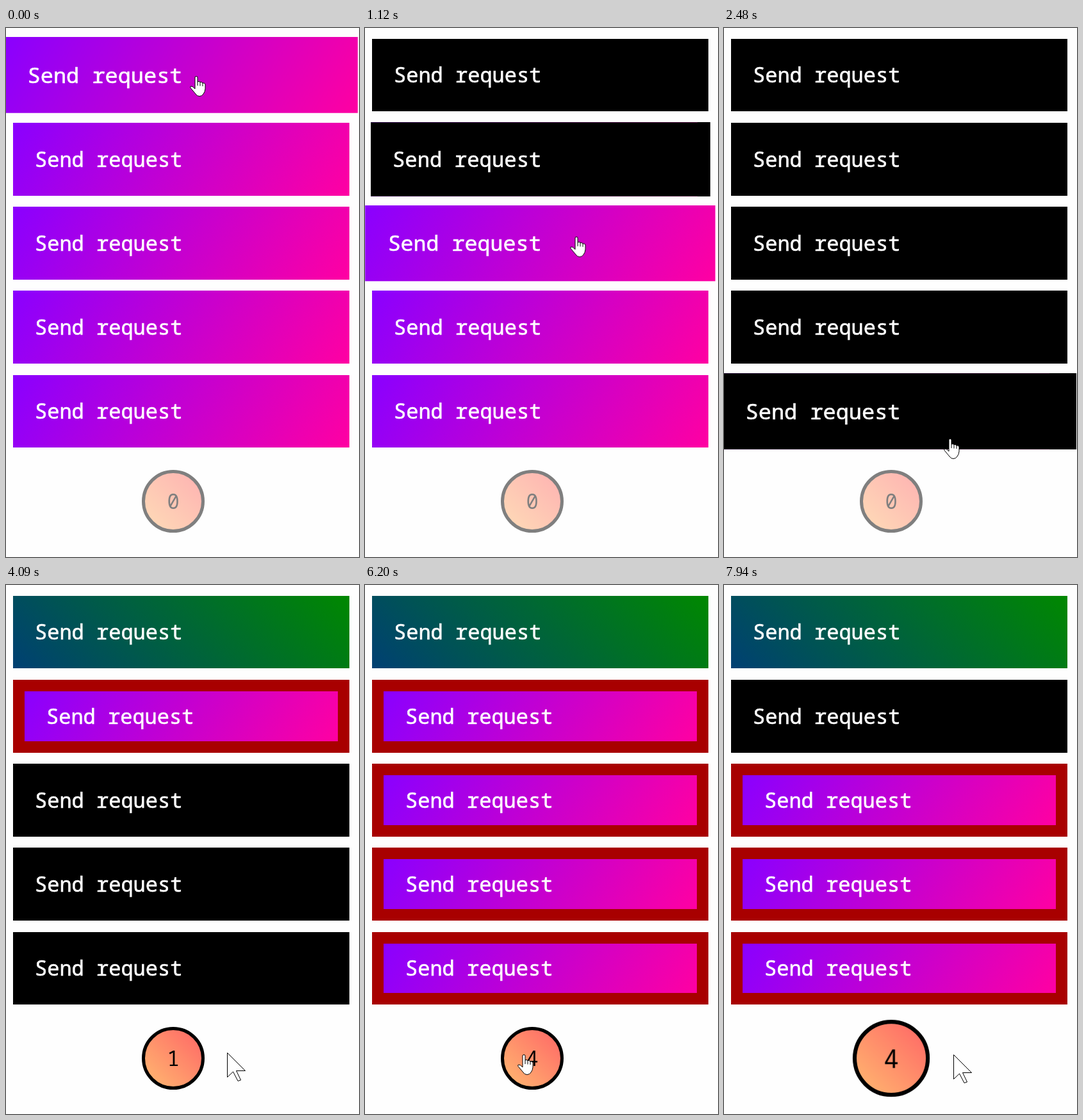
An HTML page that plays this animation: 551x826 px, repeating every 8000 ms.

```html
<!DOCTYPE html>
<html lang="en">
<head>
<meta charset="utf-8">
<title>Request queue</title>
<style>
  html, body { margin: 0; width: 100%; height: 100%; overflow: hidden; background: #fefefe; }
  body { position: relative; font: 32px "Noto Sans Mono", monospace; }

  .button {
    position: absolute; left: 11px; width: 525px;
    box-sizing: border-box; border: 0 solid #a80000;
    display: flex; align-items: center; color: #fff;
    background: linear-gradient(120deg, #8a00ff, #ff00a2);
  }
  .button::before, .button.ok::after { content: ""; position: absolute; inset: 0; }
  .button.ok::after { background: linear-gradient(45deg, #004073, #008800); animation: ok 8s infinite; }
  .button span {
    position: relative; z-index: 1; left: 34px; top: -1px;
    white-space: pre; -webkit-text-stroke: .6px #fff;
  }

  .counter {
    position: absolute; left: 212px; top: 690px; width: 88px; height: 88px;
    border: 5px solid #000; border-radius: 50%; overflow: hidden;
    background: linear-gradient(45deg, #ffb970, #ff6666);
    text-align: center; line-height: 88px;
    animation: wake 8s infinite, pulse 8s infinite;
  }
  .digits { animation: count 8s step-end infinite; }

  .cursor { position: absolute; left: 0; top: 0; animation: move 8s linear infinite; }
  .cursor svg { position: absolute; overflow: visible; fill: #fff; stroke: #000; stroke-linejoin: round; }
  .hand { left: -10px; animation: hand 8s step-end infinite; }
  .arrow { animation: arrow 8s step-end infinite; }
</style>
</head>
<body>
<div class="counter"><div class="digits">0<br>1<br>2<br>3<br>4</div></div>
<div class="cursor">
  <svg class="hand" width="25" height="32">
    <path d="M8 2Q8 .5 10 .5Q12 .5 12 2V9Q14 7.5 16 9.5Q18 8.5 20 11Q23 10 24 13V20Q23.5 25 21 28Q19 31.5 15 31.5Q11 31.5 9 28L1 18.5Q0 16 2 16Q4 15.5 8 20Z"/>
    <path d="M12 9V15M16 9.5V15.5M20 11V16" fill="none"/>
  </svg>
  <svg class="arrow" width="30" height="46">
    <path d="M.5.5V38.5L9.5 30L17 44.5L21.5 43L14.5 28.5H28.5Z"/>
  </svg>
</div>
<script>
const LOOP = 8000, FADE = 200, PITCH = 131.25;
const RETRY = 7330, PEAK = RETRY + 510;
const presses = [630, 880, 1450, 1786, 2260];

// Where the pointer rests, and from when to when: one stop per button, then aside, counter, aside.
const stops = [
  { x: 297, y: 75, from: 0, to: 640 },
  { x: 310, y: 215, from: 860, to: 912 },
  { x: 331, y: 331, from: 1131, to: 1460 },
  { x: 346, y: 505, from: 1780, to: 1880 },
  { x: 353, y: 641, from: 2160, to: 2500 },
  { x: 345, y: 730, from: 2810, to: 5850 },
  { x: 248, y: 733, from: 6200, to: 7400 },
  { x: 358, y: 733, from: 7700, to: LOOP }
];

// Time at which the pointer, leaving stop i, passes a coordinate.
const crossing = (i, axis, value) => {
  const a = stops[i], b = stops[i + 1];
  return a.to + (b.from - a.to) * (value - a[axis]) / (b[axis] - a[axis]);
};
const leaveTime = i => crossing(i, "y", 139.5 + PITCH * i);
const doneTime = i => i ? 3380 + 455 * i : presses[0] + 2000;

let css = "";
const keyframes = (name, steps) => {
  css += `@keyframes ${name} {` +
    steps.map(([ms, rule]) => `${(ms / LOOP * 100).toFixed(4)}% {${rule}}`).join(" ") + "}\n";
};
const scale = s => `transform:scale(${s})`;
const opacity = o => `opacity:${o}`;
const paint = c => `background:${c}`;

// Rests on the first value, then eases to each next one from its given time.
const eased = (start, ...changes) => {
  const steps = [];
  let rule = start;
  for (const [ms, next] of changes) {
    steps.push([ms, rule], [ms + FADE, next]);
    rule = next;
  }
  return [[0, start], ...steps, [LOOP, rule]];
};
const jump = (ms, before, after) => [[ms - 1, before], [ms, after]];
const blacken = ms => [...jump(ms, paint("transparent"), paint("#fff")), [ms + FADE, paint("#000")]];

presses.forEach((press, i) => {
  const el = document.createElement("div");
  const top = Math.round(16.6 + PITCH * i);
  el.className = i ? "button" : "button ok";
  el.id = "b" + i;
  el.style.top = top + "px";
  el.style.height = Math.round(130.3 + PITCH * i) - top + "px";
  el.innerHTML = "<span>Send request</span>";
  document.querySelector(".counter").before(el);

  const retried = i === 1;
  const leave = [leaveTime(i), scale(1)];
  keyframes("hover" + i, i ? eased(scale(1), [leaveTime(i - 1), scale(1.05)], leave) : eased(scale(1.05), leave));

  keyframes("fill" + i, [
    [0, paint("transparent")], ...blacken(press),
    ...jump(doneTime(i), paint("#000"), paint("transparent")),
    ...(retried ? blacken(RETRY) : []),
    [LOOP, paint(retried ? "#000" : "transparent")]
  ]);

  const thin = "border-width:0", thick = "border-width:18px";
  const borders = i ? [[doneTime(i), thick]] : [];
  if (retried) borders.push([RETRY, thin]);
  keyframes("border" + i, eased(thin, ...borders));

  css += `#b${i} { animation: hover${i} 8s infinite, border${i} 8s infinite; }
    #b${i}::before { animation: fill${i} 8s infinite; }\n`;
});

keyframes("ok", [[0, opacity(0)], ...jump(doneTime(0), opacity(0), opacity(1)), [LOOP, opacity(1)]]);
keyframes("wake", eased(opacity(.5), [doneTime(1), opacity(1)]));
keyframes("count", presses.map((_, i) => [i ? doneTime(i) : 0, `transform:translateY(${-88 * i}px)`])
  .concat([[LOOP, "transform:translateY(-352px)"]]));

// The loop cuts the pulse off on its way down.
keyframes("pulse", [[0, scale(1)], [RETRY, scale(1)],
  [PEAK, scale(1.333) + ";animation-timing-function:linear"], [LOOP, scale(1.165)]]);

keyframes("move", stops.flatMap(({ x, y, from, to }) =>
  [from, to].map(ms => [ms, `transform:translate(${x}px,${y}px)`])));

// A hand over the buttons and the counter, an arrow elsewhere.
const toggles = [0, leaveTime(4), crossing(5, "x", 310), crossing(6, "x", 312), LOOP];
["hand", "arrow"].forEach((name, n) =>
  keyframes(name, toggles.map((ms, i) => [ms, opacity((i + n + 1) % 2)])));

const sheet = document.createElement("style");
sheet.textContent = css;
document.head.append(sheet);
</script>
</body>
</html>
```
